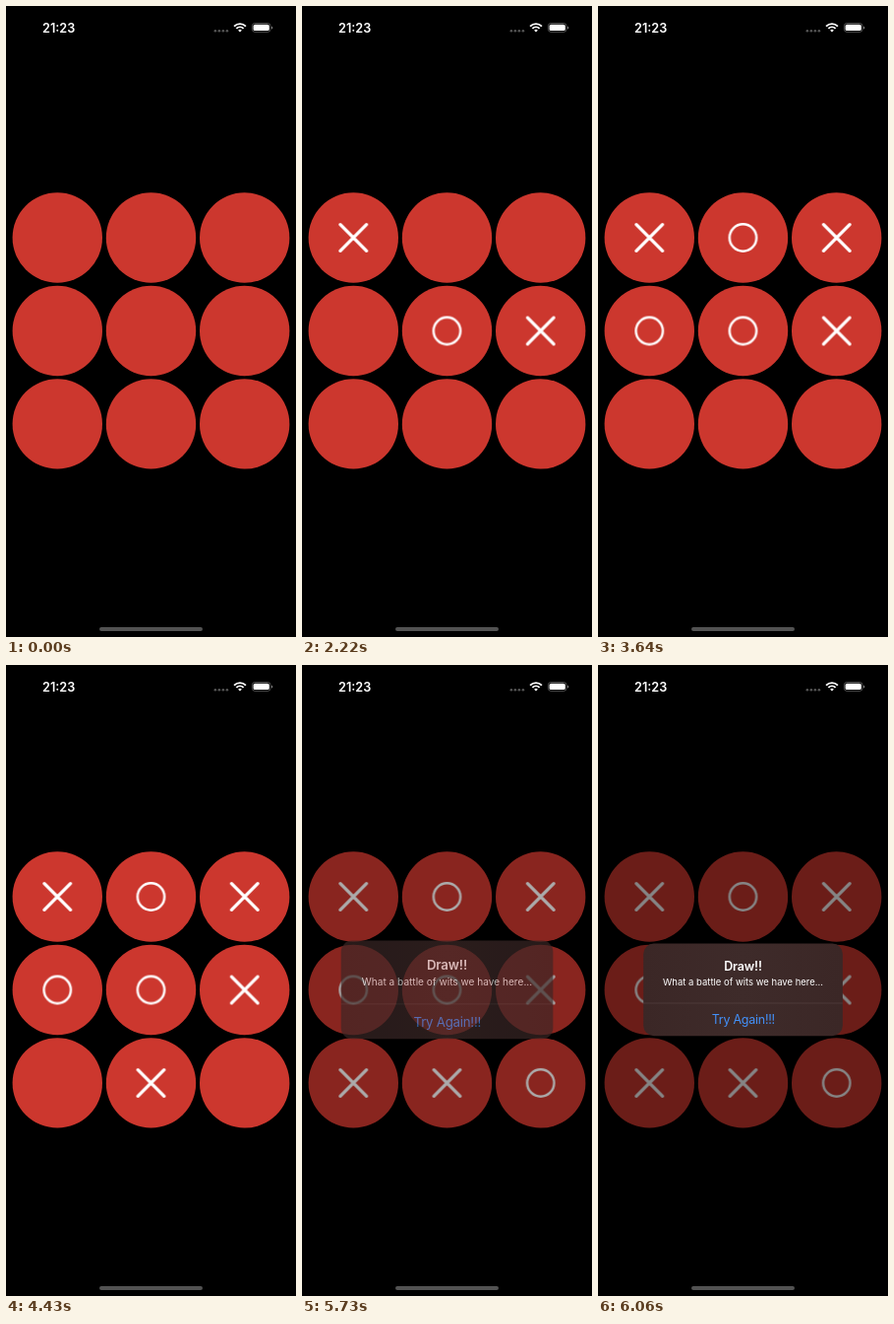
An HTML page that plays this animation: 295 px wide and 640 px high, repeating every 7630 ms.

```html
<!DOCTYPE html>
<html lang="en">
<head>
<meta charset="utf-8">
<title>Noughts and crosses</title>
<style>
html, body { margin: 0; width: 100%; height: 100%; overflow: hidden; background: #000; }
svg { display: block; width: 100%; height: 100%; font-family: Inter, "Liberation Sans", sans-serif; }
text { text-anchor: middle; fill: #fff; }

.disc { fill: #cc372e; }
.mark { fill: none; stroke: #fff; stroke-linecap: round; }
.cross { stroke-width: 3.3; }
.ring { stroke-width: 2.4; }

/* every change is a hard step on one shared loop */
.mark, .dim, .alert { animation: 7630ms step-end infinite; }
.t1 { animation-name: t1; }
.t2 { animation-name: t2; }
.t3 { animation-name: t3; }
.t4 { animation-name: t4; }
.t5 { animation-name: t5; }
.t6 { animation-name: t6; }
.t7 { animation-name: t7; }
.t8 { animation-name: t8; }
.t9 { animation-name: t9; }
@keyframes t1 { 0% { opacity: 0 } 15.202%, to { opacity: 1 } }
@keyframes t2 { 0% { opacity: 0 } 21.887%, to { opacity: 1 } }
@keyframes t3 { 0% { opacity: 0 } 29.095%, to { opacity: 1 } }
@keyframes t4 { 0% { opacity: 0 } 36.041%, to { opacity: 1 } }
@keyframes t5 { 0% { opacity: 0 } 40.76%, to { opacity: 1 } }
@keyframes t6 { 0% { opacity: 0 } 47.706%, to { opacity: 1 } }
@keyframes t7 { 0% { opacity: 0 } 58.06%, to { opacity: 1 } }
@keyframes t8 { 0% { opacity: 0 } 65.006%, to { opacity: 1 } }
@keyframes t9 { 0% { opacity: 0 } 73.525%, to { opacity: 1 } }

.dim { animation-name: dim; }
@keyframes dim {
  0% { opacity: 0 }
  75.098% { opacity: .33 }
  76.539% { opacity: .44 }
  77.981% { opacity: .47 }
  79.423%, to { opacity: .48 }
}

.alert { animation-name: alert; transform-origin: 147.5px 329.4px; }
@keyframes alert {
  0% { opacity: 0; transform: scale(1.2) }
  75.098% { opacity: .68; transform: scale(1.064) }
  76.539% { opacity: .92; transform: scale(1.016) }
  77.981% { opacity: .98; transform: scale(1.004) }
  79.423%, to { opacity: 1; transform: none }
}
.title { font-size: 12.5px; font-weight: 600; letter-spacing: -.15px; }
.note { font-size: 9.5px; }
.action { font-size: 12.5px; letter-spacing: -.25px; fill: #4391fa; }
.clock { font-size: 12.7px; font-weight: 600; }
</style>
</head>
<body>
<svg viewBox="0 0 295 640">
  <defs>
    <g id="row">
      <circle cx="52.3" r="45.7"/>
      <circle cx="147.5" r="45.7"/>
      <circle cx="242.7" r="45.7"/>
    </g>
    <path id="x" d="M-13.3-13.3 13.3 13.3M13.3-13.3-13.3 13.3"/>
    <circle id="o" r="13.7"/>
    <linearGradient id="glass">
      <stop offset="0" stop-color="#3b2726"/>
      <stop offset=".5" stop-color="#3e2b2a"/>
      <stop offset="1" stop-color="#3b2726"/>
    </linearGradient>
  </defs>

  <g class="disc">
    <use href="#row" y="235"/>
    <use href="#row" y="329.5"/>
    <use href="#row" y="423.9"/>
  </g>

  <use class="mark cross t1" href="#x" x="52.3" y="235"/>
  <use class="mark ring t2" href="#o" x="147.5" y="329.5"/>
  <use class="mark cross t3" href="#x" x="242.7" y="329.5"/>
  <use class="mark ring t4" href="#o" x="52.3" y="329.5"/>
  <use class="mark cross t5" href="#x" x="242.7" y="235"/>
  <use class="mark ring t6" href="#o" x="147.5" y="235"/>
  <use class="mark cross t7" href="#x" x="147.5" y="423.9"/>
  <use class="mark ring t8" href="#o" x="242.7" y="423.9"/>
  <use class="mark cross t9" href="#x" x="52.3" y="423.9"/>

  <rect class="dim" width="295" height="640"/>

  <g class="alert">
    <rect x="46.2" y="282.6" width="202.7" height="93.6" rx="10.5" fill="url(#glass)"/>
    <path d="M46.2 343h202.7" stroke="#fff" stroke-opacity=".12" stroke-width=".7"/>
    <text class="title" x="147.5" y="309.8">Draw!!</text>
    <text class="note" x="147.5" y="325">What a battle of wits we have here...</text>
    <text class="action" x="147.8" y="364.3">Try Again!!!</text>
  </g>

  <!-- status bar -->
  <text class="clock" x="53.7" y="26.6">21:23</text>
  <g fill="#555">
    <circle cx="212.9" cy="25.3" r="1.3"/>
    <circle cx="216.9" cy="25.3" r="1.3"/>
    <circle cx="220.9" cy="25.3" r="1.3"/>
    <circle cx="224.9" cy="25.3" r="1.3"/>
  </g>
  <g transform="translate(238 26.5)">
    <path d="M-5.94-5.94A8.4 8.4 0 0 1 5.94-5.94M-3.6-3.6A5.1 5.1 0 0 1 3.6-3.6" fill="none" stroke="#fff" stroke-width="1.9"/>
    <path d="M0 0-1.85-1.85A2.6 2.6 0 0 1 1.85-1.85Z" fill="#fff"/>
  </g>
  <rect x="250.4" y="17.5" width="18.6" height="8.8" rx="2.7" fill="none" stroke="#666" stroke-width=".8"/>
  <rect x="251.6" y="18.7" width="16.2" height="6.4" rx="1.7" fill="#fff"/>
  <path d="M270 20.4q1.4.5 1.4 1.5t-1.4 1.5z" fill="#777"/>

  <rect x="95" y="630" width="105" height="4" rx="2" fill="#525252"/>
</svg>
</body>
</html>
```
